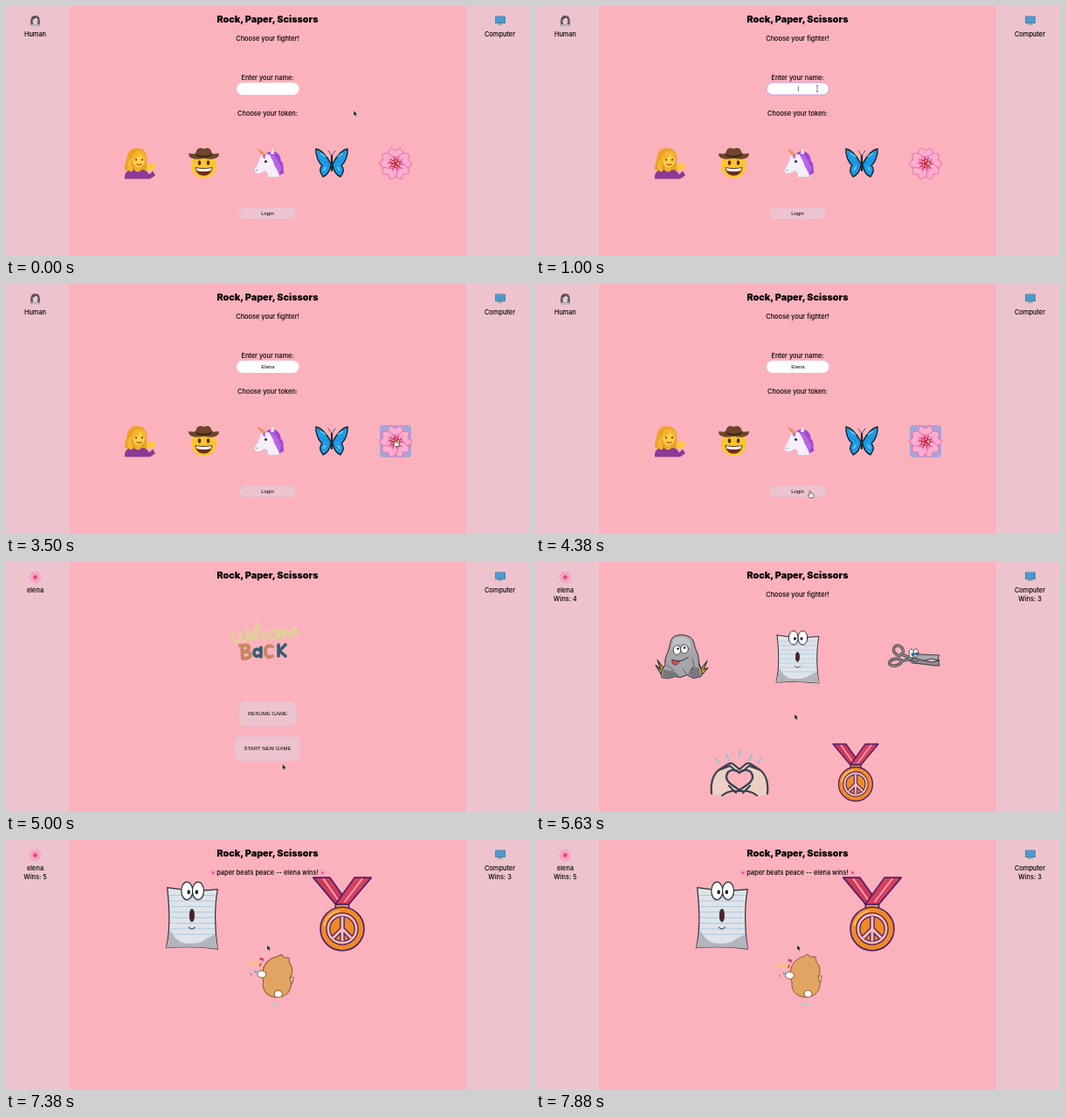
Recreate the animation shown at these times as an HTML page. Size 600 by 287 pixels, loop 8 s.

```html
<!DOCTYPE html>
<html lang="en">
<head>
<meta charset="utf-8">
<title>Rock, Paper, Scissors</title>
<style>
  html, body { margin: 0; height: 100%; overflow: hidden; background: #fcb2bd; }
  svg { display: block; width: 100vw; height: 100vh; }
  text { font: 500 7.4px Inter, sans-serif; text-anchor: middle; }
  .title { font-weight: 900; font-size: 10.8px; }
  .ui { font: 6px "Liberation Sans", Arial, sans-serif; }
  .menu { fill: #fff; text-anchor: start; }
  .button { fill: #edc4cd; stroke: #e2bdd6; stroke-width: .8; }
  .ink { stroke: #2e2e33; stroke-width: 1; stroke-linejoin: round; stroke-linecap: round; }
  .line { fill: none; stroke-linecap: round; stroke-linejoin: round; }
</style>
</head>
<body>
<svg viewBox="0 0 600 287">
  <defs>
    <g id="petal">
      <path d="M0 0C-9-5-11-14-5-18L0-15 5-18C11-14 9-5 0 0Z" fill="#fbaed0" stroke="#ee6fa6" stroke-width="1"/>
      <path d="M0 0L-4-10 0-8 4-10Z" fill="#f27fb2"/>
    </g>
    <g id="flower">
      <use href="#petal"/>
      <use href="#petal" transform="rotate(72)"/>
      <use href="#petal" transform="rotate(144)"/>
      <use href="#petal" transform="rotate(216)"/>
      <use href="#petal" transform="rotate(288)"/>
      <circle r="5" fill="#cf2b62"/>
      <circle r="6" fill="none" stroke="#cf2b62" stroke-width="3" stroke-dasharray="1 2.77"/>
      <circle r="3.2" fill="none" stroke="#ffd782" stroke-width="1.8" stroke-dasharray="1.5 2.1"/>
    </g>

    <g id="lady">
      <path d="M-13 9C-20 8-16 1-15-4-14-14-9-18-2-17 7-17 9-9 8-2 8 3 11 6 8 9Z" fill="#eda21f"/>
      <path d="M-17 18C-18 9-12 7-4 7 6 7 9 9 11 13L15 9 18 14 12 18Z" fill="#8b3a96"/>
      <path d="M-5 3h6l1 5q-4 4-8 0Z" fill="#eab32d"/>
      <ellipse cx="-1" cy="-4" rx="7" ry="9" fill="#ffd04a"/>
      <path d="M-9-3C-9-13-3-15 2-14 7-12 8-6 7-3 3-5 2-8 1-11-1-7-5-5-9-3Z" fill="#f5b431"/>
      <path d="M-12-4C-16 2-13 9-10 10L-7 8C-10 4-9-1-9-6Z" fill="#f5b431"/>
      <path d="M8 7C7 2 10 0 18 0L17 3 18 5 13 9Z" fill="#ffc93c"/>
      <g fill="#553313"><circle cx="-4" cy="-4" r="1.1"/><circle cx="3" cy="-4" r="1.1"/></g>
      <path d="M-3 1q2.500 2 5 0" class="line" stroke="#c23e34" stroke-width="1.3"/>
    </g>

    <g id="cowboy">
      <circle cy="3" r="14.500" fill="#fdc52e"/>
      <path d="M-17-11C-12-10-10-10-9-12-8-17-4-18 0-16 4-18 8-17 9-12 10-10 12-10 17-11 19-5 10-3 0-5-10-3-19-5-17-11Z" fill="#6d452b"/>
      <path d="M-9-10Q0-6 9-10V-8Q0-4-9-8Z" fill="#3a2417"/>
      <g fill="#4d2d12"><ellipse cx="-5" rx="1.800" ry="2.800"/><ellipse cx="5" rx="1.800" ry="2.800"/></g>
      <path d="M-10 5Q0 7 10 5C9 18-9 18-10 5Z" fill="#6b2f16"/>
      <path d="M-9 6Q0 8 9 6L8 9Q0 11-8 9Z" fill="#fff"/>
    </g>

    <g id="unicorn">
      <path d="M-3-11C6-18 15-10 14-3 19 1 16 7 18 11L9 16 2 2Z" fill="#9d47d0"/>
      <path d="M-9-9C-3-13 6-10 8-1 9 5 14 10 12 16H-1C0 12-2 9-5 9-8 12-15 14-16 9-17 6-11 2-9-9Z" fill="#f4eff8" stroke="#cbbfd8" stroke-width=".6"/>
      <path d="M1-10C10-10 11-1 15 4 15 8 13 10 12 13 10 6 6 3 6-1Z" fill="#b965e2"/>
      <path d="M-3-10C-8-14-8-6-4-5Z" fill="#c06be0"/>
      <path d="M-7-9L-14-18-3-11Z" fill="#f0a63a"/>
      <path d="M-11-14l2-1M-9-12l3-1" stroke="#e0559a"/>
      <path d="M2-11l3-6 2 7Z" fill="#f1e8f4"/>
      <circle cx="-3" cy="-2" r="1.600" fill="#382c4a"/>
      <circle cx="-13" cy="8" r=".8" fill="#7d6a8c"/>
    </g>

    <g id="wing">
      <path d="M-1 1C-6-8-12-15-18-16-19-9-15 0-11 3-15 7-13 12-10 16-5 14-2 8-1 3Z" fill="#1d9fe8" stroke="#17222e" stroke-width="1.400"/>
      <path d="M-1 2L-15-13M-2 2L-14-4M-2 3L-10 12" stroke="#1279be" stroke-width=".6"/>
      <path d="M-7-7l-6-4M-7 5l-2 4" stroke="#62cbfa" stroke-width="1.700"/>
    </g>
    <g id="butterfly">
      <use href="#wing"/><use href="#wing" transform="scale(-1 1)"/>
      <path d="M0-8V9" class="line" stroke="#20242b" stroke-width="2.200"/>
      <path d="M-4-14L0-8 4-14" class="line" stroke="#20242b" stroke-width=".7"/>
    </g>

    <g id="rock" class="ink">
      <path d="M-24 20l-6-10 6 5-4-11 7 9 2 9ZM17 21l2-15 3 8 7-9-4 10 5-2-7 8Z" fill="#c9a52c" stroke-width="1.100"/>
      <path d="M-23 24C-25 17-21 14-19 9-20 3-17-3-15-8-13-14-14-19-9-23-3-26 5-25 10-22 15-18 14-11 17-6 20 0 19 7 20 11 24 16 23 20 22 23L13 25 6 21-2 24-8 23-15 25Z" fill="#a5a5aa"/>
      <path d="M-10-20Q-2-25 7-21C10-17 10-12 11-8Q5-16-3-14-9-14-13-7Z" fill="#bfbfc4" stroke="none"/>
      <path d="M-21 15L-9 17-3 22-8 23-15 24-22 23ZM7 20L12 12 20 13 21 22 13 24Z" fill="#77777d" stroke="none"/>
      <path d="M12 3l2 8-4 5M-17 10l8 6M1 14l4 6" fill="none" stroke-width=".6"/>
      <g fill="#fff" stroke-width=".8"><ellipse cx="-5.500" cy="-7.500" rx="4.300" ry="5.300"/><ellipse cx="3" cy="-8.500" rx="4.300" ry="5"/></g>
      <circle cx="-4.500" cy="-9" r=".9"/><circle cx="3" cy="-10" r=".9"/>
      <path d="M-11 4Q-2 8 7 1" fill="none"/>
      <path d="M-11 4C-13 10-5 12-3 6Z" fill="#dc4a4d" stroke-width=".7"/>
    </g>

    <g id="paper" class="ink">
      <path d="M-24-55Q0-51 24-53.500C21-39 21-18 24 0Q0-3-25-1C-21-17-22-38-24-55Z" fill="#dfe4ea"/>
      <path d="M-22-48H21M-21-43H21M-21-38H20M-21-33H20M-21-28H20M-21-23H21M-21-18H21M-21-13H21" stroke="#a3c3dc" stroke-width=".7"/>
      <path d="M-21-17Q-17-7-7-5 8-4 13-9L22-13 24 0Q0-3-25-1Z" fill="#b3b5ba" stroke="none"/>
      <path d="M-10-48Q-5-40 0-46 5-40 11-48" fill="#b9bec6" stroke="none"/>
      <g fill="#fff"><ellipse cx="-5.200" cy="-52" rx="5.400" ry="8"/><ellipse cx="5.400" cy="-52" rx="5.400" ry="8"/></g>
      <ellipse cx="-3.600" cy="-51" rx="1" ry="1.500"/><ellipse cx="4" cy="-51" rx="1" ry="1.500"/>
      <ellipse cx="-.5" cy="-30" rx="2" ry="5.400" fill="#5a1c24"/>
      <path d="M-3.500-19.500Q-.5-16 2.500-19.500" fill="none" stroke-width=".8"/>
    </g>

    <g id="rings" class="line">
      <ellipse cx="-18" cy="-6.500" rx="5" ry="6" transform="rotate(-35 -18 -6.500)"/>
      <ellipse cx="-21.500" cy="7" rx="7" ry="4" transform="rotate(-12 -21.500 7)"/>
      <path d="M-14-2L-3 3M-15 6L-3 3"/>
    </g>
    <g id="scissors" class="ink">
      <path d="M-5 1L6-2 29-1 27 2 29 5 20 3 8 6Z" fill="#a9aaae" stroke-width=".9"/>
      <path d="M-8 3L0 2 10 5 20 7 28 5 29 11 24 11 8 9-2 8Z" fill="#8b8c91" stroke-width=".9"/>
      <use href="#rings" style="stroke-width:3.2px"/>
      <use href="#rings" style="stroke:#96979b;stroke-width:1.5px"/>
      <g fill="#fff" stroke-width=".8"><ellipse cx="-3" cy="-3" rx="2.800" ry="5"/><ellipse cx="2" cy="-3.500" rx="2.800" ry="4.800"/></g>
      <g fill="#2787cc" stroke-width=".6"><circle cx="-1.500" cy="-2" r="1.600"/><circle cx="2.500" cy="-2.500" r="1.600"/></g>
      <path d="M-3 5q4 3 8 0" fill="none" stroke-width=".8"/>
    </g>

    <path id="hand" d="M-31 18C-33 9-31-3-24-10L-13-17Q-9-19-6-16L0-11V14L-10 14Q-15 14-20 20Z" fill="#edd0c5"/>
    <path id="fingers" d="M-32 17C-33 7-31-4-24-10L-13-17Q-9-19-6-16L0-11M-24-10L-11-15-4-9M0 14L-9 14Q-15 15-20 19M-12 8L-4 16"/>
    <g id="love">
      <use href="#hand"/><use href="#hand" transform="scale(-1 1)"/>
      <path d="M0 13C-6 8-16 4-15-3-14-11-5-12 0-7 5-12 14-11 15-3 16 4 6 8 0 13Z" fill="#fcb2bd" stroke="#39424e" stroke-width="2.400"/>
      <g class="line" stroke="#39424e" stroke-width="2.200"><use href="#fingers"/><use href="#fingers" transform="scale(-1 1)"/></g>
      <path d="M-27-23l4 4M-15-28l3 7M0-33v9M14-28l-3 7M25-23l-4 4" class="line" stroke="#74c9df" stroke-width="1.600"/>
    </g>

    <path id="peace" d="M0-11V11M0 0L-8 8M0 0L8 8"/>
    <g id="medal" stroke="#4b1f68" stroke-width="1.300" stroke-linejoin="round">
      <path d="M-26-46H-11L6-22H-6Z" fill="#cf3957"/>
      <path d="M-17-45L-3-25" stroke="#f2a3b2" stroke-width="1.500"/>
      <path d="M26-46H11L-6-22H6Z" fill="#d83f5c"/>
      <path d="M18-45L2-24" stroke="#f2a3b2" stroke-width="1.500"/>
      <rect x="-6" y="-22" width="12" height="4" rx="1.500" fill="#f6a73a"/>
      <circle r="19.500" fill="#f08a24"/>
      <path d="M-16-3A16 16 0 0 1-3-16" class="line" stroke="#fcb95a" stroke-width="1.800"/>
      <circle r="14" fill="#f8bcb4"/>
      <circle r="11.200" fill="#f08a24"/>
      <use href="#peace" stroke-width="4.400"/>
      <use href="#peace" stroke="#f8bcb4" stroke-width="2.300"/>
      <circle r="12.600" fill="none" stroke="#f8bcb4" stroke-width="2"/>
    </g>
  </defs>

  <rect width="600" height="287" fill="#fcb2bd"/>
  <path d="M0 0H72V287H0ZM527 0H600V287H527Z" fill="#edc4cd"/>
  <text x="299.500" y="18.800" class="title">Rock, Paper, Scissors</text>

  <g id="human" transform="translate(33.500 17)">
    <path d="M-5 6C-6-2-5-6 0-6S6-2 5 6Z" fill="#5d5260"/>
    <path d="M-6 6.500Q-5 3 0 3T6 6.500Z" fill="#b9b3c4"/>
    <ellipse rx="3" ry="3.800" fill="#f3d3c6"/>
    <path d="M-3-1Q0-2 1-4L3-1 2-5H-2Z" fill="#5d5260"/>
    <path d="M-1.500 0v.8M1.500 0v.8" stroke="#4a3a3a" stroke-width=".7"/>
  </g>
  <use id="avatar" href="#flower" transform="translate(33.500 17.500) scale(.36)"/>
  <text id="player" x="33.500" y="34.500"></text>
  <text id="wins" x="33.500" y="45"></text>
  <path d="M563.500 19.500h4.500l1 2.500h-6.500Z" fill="#a3a6ab"/>
  <rect x="560" y="11.500" width="12" height="8.500" rx=".8" fill="#63707c"/>
  <rect x="560.500" y="12" width="11" height="7.200" fill="#4a9ad2"/>
  <text x="565.500" y="34.500">Computer</text>
  <text id="rivalWins" x="565.500" y="45">Wins: 3</text>
  <text id="prompt" x="299.500" y="39.700">Choose your fighter!</text>

  <g id="login">
    <text x="299.500" y="85">Enter your name:</text>
    <rect id="field" x="264" y="88" width="71.500" height="14" rx="7" fill="#fff"/>
    <text id="typed" x="300" y="97" class="ui"></text>
    <path id="caret" d="M0 92v6" stroke="#222" stroke-width=".6"/>
    <text x="299.500" y="126.300">Choose your token:</text>
    <rect id="picked" x="428" y="162" width="36" height="37" rx="4" fill="#a3a6d8"/>
    <use href="#lady" x="153" y="180.500"/>
    <use href="#cowboy" x="226.500" y="180"/>
    <use href="#unicorn" x="300.500" y="180.500"/>
    <use href="#butterfly" x="373" y="180"/>
    <use href="#flower" x="446" y="181"/>
    <rect x="267" y="232" width="65" height="12.500" rx="6.200" class="button"/>
    <text x="299.500" y="240.300" class="ui">Login</text>
    <g id="menu">
      <path d="M296 106.500l4-4.500 4 4.500H357q2 0 2 2V139q0 2-2 2H292.500q-2 0-2-2V108.500q0-2 2-2Z" fill="#232427"/>
      <text x="295.500" y="118" class="ui menu">Elena Robles Marona</text>
      <text x="295.500" y="134" class="ui menu">elena</text>
    </g>
  </g>

  <g id="welcome">
    <g class="line" stroke="#dcd592" stroke-width="2.400">
      <path d="M260 79q0 15 4 13 4-2 5-10 0 11 4 9 4-3 3-14"/>
      <path d="M277 87q7-2 5-6-4-1-4 5 1 6 7 1 5-6 5-15-3-5-4 5-1 13 4 10M299 80q-6-1-6 6 1 5 7 1"/>
      <ellipse cx="306" cy="83" rx="4.500" ry="5"/>
      <path d="M313 78v11q0-10 4-11l1 10q1-10 4-10l2 8M327 82q6-2 5-6-4-1-4 5 1 6 8 1"/>
    </g>
    <g class="line" stroke="#c78760" stroke-width="4">
      <path d="M270 96l1 14M268 96q11-2 10 3-1 4-7 4 9-1 9 4-1 4-9 4M305 97q-8-3-8 6 1 9 8 5"/>
    </g>
    <g class="line" stroke="#365d73" stroke-width="3.600">
      <path d="M292 98v11M291 101q-7-3-7 4 1 5 7 2M312 95v13M320 95l-7 7 7 6"/>
    </g>
    <path d="M259 99v.1M263 107v.1M257 104v.1M338 71v.1M341 77v.1M335 68v.1M329 95v.1M262 71v.1" class="line" stroke="#f4ddc5" stroke-width="1.500"/>
    <rect x="267" y="160.500" width="65.500" height="28" rx="6" class="button"/>
    <text x="299.500" y="176.300" class="ui">RESUME GAME</text>
    <rect x="262" y="200.500" width="75" height="28" rx="6" class="button"/>
    <text x="299.500" y="216.300" class="ui">START NEW GAME</text>
  </g>

  <g id="game">
    <use href="#rock" x="167" y="108.500"/>
    <use id="paperChoice" href="#paper"/>
    <use href="#scissors" x="433" y="108"/>
    <use href="#love" x="233" y="249"/>
    <use href="#medal" x="366" y="255"/>
    <use id="token" href="#flower" transform="translate(300 149.500) scale(.36)"/>
  </g>

  <g id="result">
    <use href="#flower" transform="translate(237 37.500) scale(.19)"/>
    <use href="#flower" transform="translate(362.500 37.500) scale(.19)"/>
    <use href="#paper" transform="translate(213.500 125) scale(1.200 1.280)"/>
    <use href="#medal" transform="translate(385 102) scale(1.280)"/>
    <ellipse cx="308" cy="188.500" rx="6" ry="1" fill="#b3ccc6"/>
    <g id="cat" stroke="#8c572e" stroke-width="1">
      <path d="M321 165q6 2 6-9-4-1-5 4Z" fill="#f5dfc8"/>
      <path d="M294 143Q298 136 306 134L311 131 314 134 320 134 321 140C326 145 326 152 323 157 328 166 324 178 313 180 300 182 292 175 293 163 290 156 291 148 294 143Z" fill="#e2a462"/>
      <ellipse cx="290.500" cy="155.500" rx="5" ry="4" fill="#fff"/>
      <ellipse cx="311.500" cy="176.500" rx="4.500" ry="4" fill="#fff"/>
    </g>
    <g id="confetti" stroke-width="3" class="line">
      <path d="M276 144v.1M283 145l1-2" stroke="#f3cf3e"/>
      <path d="M290 138l2 1" stroke="#d83a78"/>
      <path d="M289 146l1-2" stroke="#e2574a" stroke-width="2"/>
      <path d="M284 153v.1" stroke="#4cb4e0"/>
      <path d="M279 156v.1" stroke="#a86ac8" stroke-width="2"/>
    </g>
  </g>

  <g id="cursor">
    <path id="arrow" d="M0 0v6.200l1.400-1.300 1 2.200 1.200-.6-1-2.100h1.900Z" fill="#111" stroke="#fff" stroke-width=".4"/>
    <path id="pointer" d="M-1 0q1-1 1.600 0v2.500l3 .8q.8.500.5 2L3.500 7.500H-.5L-2.800 4.500q.5-1 1.800 0Z" fill="#fff" stroke="#222" stroke-width=".6"/>
    <path id="beam" d="M-1-3.500h2M0-3.500v7M-1 3.500h2" stroke="#333" stroke-width=".6"/>
  </g>
</svg>
<script>
const LOOP = 8000, STEP = 125;
const NAME = 'Elena', KEY_TIMES = [1125, 1250, 1500, 1625, 1875];
const PICK = 2875, LOGIN = 4625, RESUME = 5375, CHOOSE = 6625, RESULT = 7250;

// Cursor stops: time, x, y
const PATH = [
  [0, 398, 120], [250, 398, 120], [750, 322, 95], [1875, 322, 95], [2125, 378.5, 78.5],
  [2375, 400, 120], [2750, 446, 179], [3625, 446, 179], [4250, 314, 238], [4625, 314, 238],
  [4875, 316.5, 232], [5000, 316.5, 232], [5250, 301, 178], [5625, 296, 174.5],
  [5875, 297, 160], [6250, 299, 120.5], [LOOP, 299, 120.5]
];
// Clickable areas per screen: x, y, width, height
const HOT = {
  login: [[135, 162, 36, 37], [209, 162, 36, 37], [282, 162, 36, 37], [355, 162, 36, 37], [428, 162, 36, 37], [267, 232, 65, 12]],
  welcome: [[267, 160, 65, 28], [262, 200, 75, 28]],
  game: [[275, 79, 50, 61]],
  result: []
};

const $ = id => document.getElementById(id);
const show = (id, on) => { $(id).style.display = on ? '' : 'none'; };
const move = (id, value) => $(id).setAttribute('transform', value);
const inside = (x, y) => ([l, t, w, h]) => x >= l && x <= l + w && y >= t && y <= t + h;

function cursorAt(t) {
  const i = PATH.findIndex(stop => stop[0] > t);
  const [t0, x0, y0] = PATH[i - 1], [t1, x1, y1] = PATH[i];
  const p = (t - t0) / (t1 - t0), e = p * p * (3 - 2 * p);
  return [x0 + (x1 - x0) * e, y0 + (y1 - y0) * e];
}

function draw(t) {
  const screen = t < LOGIN ? 'login' : t < RESUME ? 'welcome' : t < RESULT ? 'game' : 'result';
  const [x, y] = cursorAt(t);
  const hovering = HOT[screen].some(inside(x, y));
  Object.keys(HOT).forEach(id => show(id, id === screen));

  const loggedIn = t >= LOGIN;
  show('human', !loggedIn);
  show('avatar', loggedIn);
  $('player').textContent = loggedIn ? NAME.toLowerCase() : 'Human';
  $('wins').textContent = t < RESUME ? '' : t < RESULT ? 'Wins: 4' : 'Wins: 5';
  show('rivalWins', t >= RESUME);
  show('prompt', screen !== 'welcome');
  $('prompt').textContent = screen === 'result'
    ? `paper beats peace -- ${NAME.toLowerCase()} wins!` : 'Choose your fighter!';

  const typed = KEY_TIMES.filter(k => k <= t).length;
  const focused = t >= 750 && t < PICK;
  $('typed').textContent = NAME.slice(0, typed);
  $('field').setAttribute('stroke', focused ? '#c79be0' : 'none');
  show('caret', focused);
  if (screen === 'login') move('caret', `translate(${300.4 + $('typed').getComputedTextLength() / 2} 0)`);
  show('menu', focused && typed > 0);
  show('picked', t >= PICK);

  move('paperChoice', `translate(300 139) scale(${hovering ? 1.18 : 1})`);
  show('token', t >= CHOOSE);

  const sway = Math.sin((t - 7875) / STEP * 1.05);
  move('cat', `rotate(${6 * sway} 308 180)`);
  move('confetti', `translate(${2 * sway} ${-2 * sway})`);

  const inField = screen === 'login' && inside(x, y)([264, 88, 71, 14]);
  move('cursor', `translate(${x} ${y})`);
  show('cursor', t < KEY_TIMES[0] || t > 1875);
  show('pointer', hovering);
  show('beam', inField);
  show('arrow', !hovering && !inField);
}

function frame() {
  const t = performance.now() % LOOP;
  draw(Math.floor(Math.min(t + 4, LOOP - 1) / STEP) * STEP);
  requestAnimationFrame(frame);
}
frame();
</script>
</body>
</html>
```
